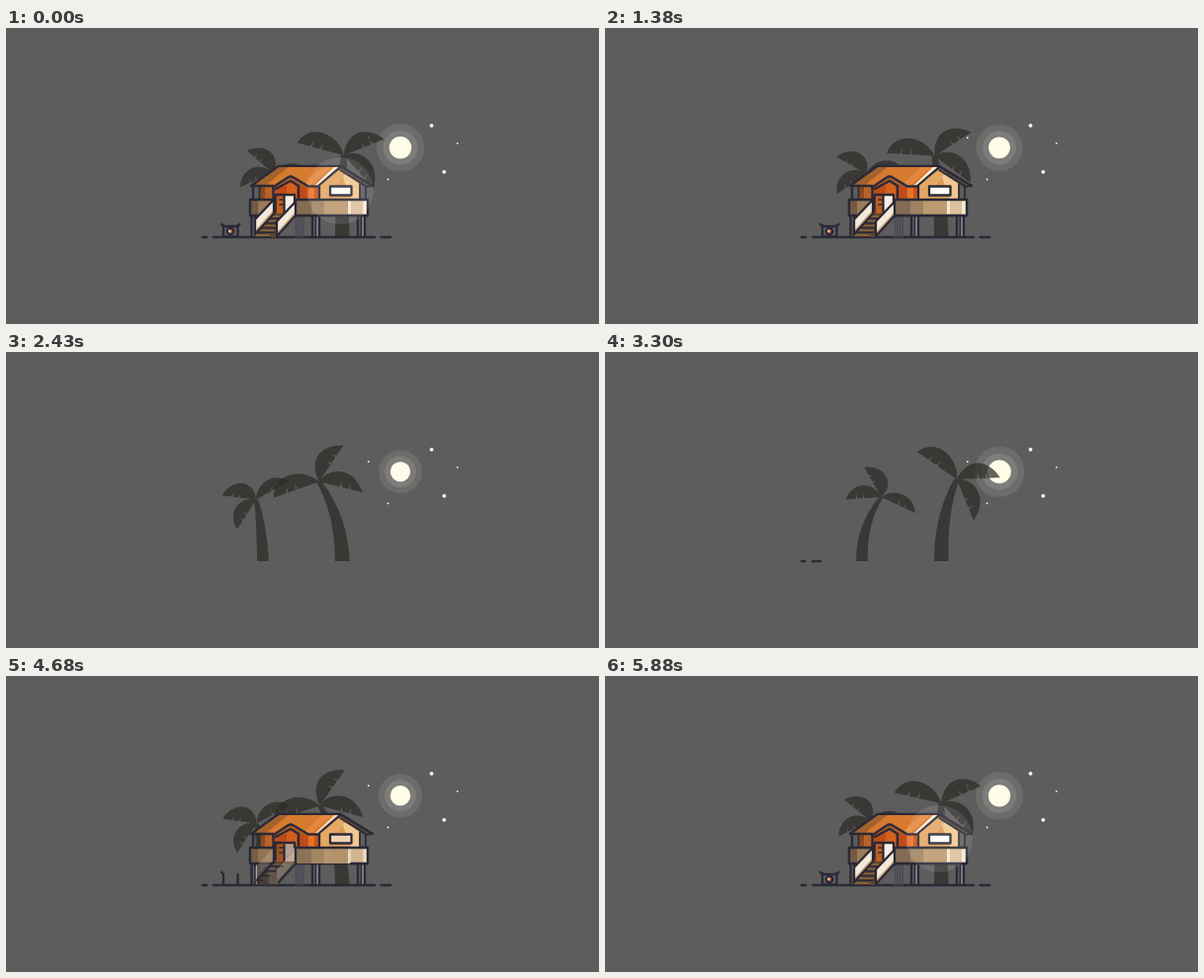
An HTML page that plays this animation: 600 px wide and 300 px high, repeating every 5910 ms.

```html
<!DOCTYPE html>
<html lang="en">
<head>
<meta charset="utf-8">
<title>Beach house at night</title>
<style>
  html, body { margin: 0; width: 100%; height: 100%; overflow: hidden; background: #5d5d5d; }
  svg { display: block; width: 600px; height: 300px; }
  .palm { fill: #2c2b27; opacity: .72; }
  .line { fill: none; stroke: #2a2937; stroke-width: 2.3; stroke-linecap: round; stroke-linejoin: round; }
  .thin { stroke-width: 1.7; }
  .far { stroke: #484854; stroke-width: 1.4; }
</style>
</head>
<body>
<svg viewBox="0 0 600 300">
  <g fill="#fffde8">
    <circle id="halo" cx="399" cy="121.3" r="24" fill="#fffff4" opacity=".09"/>
    <circle id="ring" cx="399" cy="121.3" r="17" fill="#fffff4" opacity=".11"/>
    <circle id="moon" cx="399" cy="121.3" r="11"/>
    <circle cx="430.6" cy="98.8" r="1.9"/>
    <circle cx="443.3" cy="145.8" r="1.9"/>
    <circle cx="456.8" cy="116.8" r=".9"/>
    <circle cx="386.6" cy="153.4" r=".9"/>
    <circle cx="366.8" cy="111.2" r=".9"/>
  </g>
  <g id="palms"></g>
  <g id="house"></g>
  <circle id="glow" cx="338" cy="165" r="34" fill="#fff"/>
  <circle id="pulse" cx="338" cy="165" r="8" fill="#fff"/>
  <path id="smoke" d="M227 207V181C227 168 209 172 209 152" fill="none" stroke="#b4b4b0" stroke-width="2.6"/>
</svg>
<script>
const LOOP = 5910, SWAY = 2955, PEAK = 612;
const $ = id => document.getElementById(id);
const clamp = x => Math.max(0, Math.min(1, x));
const ramp = (t, from, dur) => clamp((t - from) / dur);

function add(parent, tag, attrs) {
  const el = document.createElementNS('http://www.w3.org/2000/svg', tag);
  for (const key in attrs) el.setAttribute(key, attrs[key]);
  return parent.appendChild(el);
}

// A leaf arches from the crown to its tip; its lower edge returns with two notches.
function leafPath([ax, ay, bx, by, x, y]) {
  const side = Math.sign(x), len = Math.hypot(x, y);
  const nx = side * y / len, ny = -side * x / len;
  const at = (k, depth = 0) => `L${x * k + nx * depth} ${y * k + ny * depth}`;
  const cut = k => at(k + .02) + at(k - .02, len * .13) + at(k - .02);
  return `M0 0C${ax} ${ay} ${bx} ${by} ${x} ${y}` + cut(.7) + cut(.5) + 'Z';
}

function makePalm(spec) {
  const group = add($('palms'), 'g', { class: 'palm' });
  const trunk = add(group, 'path', {});
  const crown = add(group, 'g', {});
  spec.leaves.forEach(leaf => add(crown, 'path', { d: leafPath(leaf) }));
  return { ...spec, trunk, crown };
}

const palms = [
  makePalm({
    x: 270, y: 147, reach: 16.5, left: 254, right: 266, bend: 176, top: 2.2,
    leaves: [[10, -17, -6, -32, -26, -23], [-11, -12, -32, -7, -33, 14], [8, -12, 30, -15, 38, 4]]
  }),
  makePalm({
    x: 342, y: 129, reach: 24.5, left: 333, right: 347.7, bend: 165, top: 2.8,
    leaves: [[-4, -20, -32, -35, -47, -13], [4, -28, 26, -28, 41, -16], [14, -7, 38, 5, 30, 34]]
  })
];

function swayPalm(p, sway) {
  const lean = sway - .28;
  const x = p.x + p.reach * lean;
  const y = p.y + Math.max(0, -lean) * 2.4;
  p.crown.setAttribute('transform', `translate(${x} ${y}) rotate(${34 * lean})`);
  p.trunk.setAttribute('d', `M${p.left} 212Q${p.left} ${p.bend} ${x - p.top} ${y}` +
    `H${x + p.top}Q${p.right - 2} ${p.bend} ${p.right} 212Z`);
}

// House parts: lines draw themselves, fills fade in.
const house = $('house'), parts = [];
function line(d, start, dur, cls = '') {
  const el = add(house, 'path', { d, class: 'line ' + cls, pathLength: 1 });
  parts.push(t => {
    const p = ramp(t, start, dur);
    el.style.visibility = p > 0 ? 'visible' : 'hidden';
    el.style.strokeDasharray = p < 1 ? `${p} 2` : 'none';
  });
}
function fill(d, color, start, dur = 220) {
  const el = add(house, 'path', { d, fill: color });
  parts.push(t => { el.style.opacity = ramp(t, start, dur); });
}

line('M199 212H203', 3250, 60);
line('M210 212H373', 3280, 420);
line('M379.5 212H389', 3680, 70);

// Stilts
for (const [i, x] of [248, 309.5, 355.5].entries()) {
  line(`M${x + .5} 212v-22`, 3720 + i * 60, 200);
  line(`M${x + 4} 212v-22`, 3740 + i * 60, 200, 'thin');
  line(`M${x + 7.5} 212v-22`, 3760 + i * 60, 200);
  fill(`M${x + 5} 191h1v20h-1z`, '#a2a1a2', 3800 + i * 60);
}
for (const x of [293.5, 296, 298.5, 301]) line(`M${x} 212v-22`, 3800, 200, 'far');

// Deck frame
line('M273 190H247V174H271', 3960, 345);
line('M314 190H366V174H293', 3960, 250);
line('M314 190V174H293L274 195', 3960, 277);
line('M293 190H314', 3960, 120);
fill('M293 185h7v5h-7z', '#5c4a2e', 4060, 60);

// Back roof and walls
fill('M338 140L371 160L366 162L338 144Z', '#54443f', 4400);
fill('M257 160H317V174H257Z', '#8c4a22', 4350);
fill('M262 160H270V174H262Z', '#b5632b', 4380);
fill('M297 160H317V174H297Z', '#cf5018', 4380);
fill('M306 160H312V174H306Z', '#e4742a', 4400);
fill('M318 159L338 143L358 158V174H318Z', '#dc9c58', 4420);
fill('M338 143L358 158V174H349Z', '#f0c78f', 4460);
fill('M338 143L344 147L325 174H318V159Z', '#e5a764', 4460);
line('M317 174V160', 4250, 180);
line('M358 174V158', 4250, 180, 'thin');
line('M364 174V161', 4250, 180, 'thin');
line('M250 174V161', 4250, 180);
line('M256.5 174V161', 4250, 180, 'thin');

// Main roof
fill('M248 160L276 140H338L316 160Z', '#d67a2f', 4450);
fill('M248 160L276 140H287L262 160Z', '#a3622e', 4480);
fill('M299 160L321 140H331L308 160Z', '#e38a40', 4490);
fill('M333 140H338L317 160H312Z', '#fff1dc', 4510);
line('M248 160L276 139.8H338L371 160', 4200, 380);
line('M338 141L316 160', 4400, 180);
line('M371 160L365 161L338 144', 4450, 180, 'thin');
line('M248 160H270', 4400, 150);

// Porch gable
fill('M271 161L288 151.5L305 161V174H271Z', '#bf4c18', 4480);
fill('M271 161L288 151.5L294 155V174H284V160Z', '#d4601f', 4500);
fill('M276 158L288 150L306 160L302 162L288 155L274 163Z', '#a85a2b', 4520);
line('M270 161.5L285 151.5Q288 149.5 291 151.5L306 160.5H316', 4350, 300);
line('M273 163L288 155L296 160V172', 4450, 200);
line('M270.5 174V162', 4400, 150);

// Window
fill('M328 160.5H349.5V169.5H328Z', '#fffdf4', 4560);
line('M328 160.5H349.5V169.5H328Z', 4420, 260);

// Deck boards
fill('M247 174H271V190H247Z', '#9a7a57', 4480);
fill('M247 174H255V190H247Z', '#735a42', 4500);
fill('M292 174H366V190H292Z', '#bd9b70', 4480);
fill('M292 174H309V190H292Z', '#836c54', 4500);
fill('M309 174H322V190H309Z', '#9f8463', 4500);
fill('M346 174H366V190H346Z', '#dcc19b', 4520);
fill('M346 174H349V190H346ZM361 174H366V190H361Z', '#f6e8d0', 4540);
line('M271 190H247V174H366V190H292', 4450, 300);

// Doorway
fill('M272 169H292V190H272Z', '#6e3b1e', 4520);
fill('M273.5 170H281V188H273.5Z', '#bd5d20', 4540);
fill('M282 169.5H292V188H282Z', '#f7efe3', 4560);
line('M272.5 186V169H292V178', 4500, 200);
line('M281.5 187V170', 4520, 180);
line('M277 174H280M277 179H280', 4560, 120, 'thin');

// Stairs
fill('M271 188L252 210V212H274L292 190Z', '#5f4733', 4600);
for (let i = 0; i < 5; i++) {
  const x = 272 - i * 4, y = 190 + i * 4.8;
  fill(`M${x - 4} ${y}h15v2h-15z`, '#86643f', 4620 + i * 20);
  line(`M${x - 4} ${y + 2.8}h15`, 4600 + i * 20, 100, 'thin');
}
for (const [x, y] of [[271, 174], [293, 176]]) {
  fill(`M${x} ${y}V${y + 14}L${x - 19} ${y + 35}V${y + 20}Z`, '#c9ab88', 4640);
  fill(`M${x} ${y}V${y + 10}L${x - 19} ${y + 31}V${y + 20}Z`, '#f4e9da', 4660);
  line(`M${x} ${y}V${y + 14}L${x - 19} ${y + 35}V${y + 20}Z`, 4560, 260);
}

// Campfire
line('M220 211V200M234.5 211V200', 4600, 180);
line('M218 198.8L220 201H234.5L236.5 198.8', 4660, 180);
fill('M222.7 206a4.3 4.3 0 1 0 8.6 0a4.3 4.3 0 1 0 -8.6 0', '#2a2937', 4760);
fill('M225 206a2 2 0 1 0 4 0a2 2 0 1 0 -4 0', '#c9693a', 4800);
fill('M225.2 204.8h2v2h-2z', '#ecd3ba', 4820);
line('M222 211H232', 4760, 120, 'thin');

function drawHouse(t) {
  const leaving = t < 3000;
  const run = Math.max(0, t - 1400) / 560;
  house.style.display = leaving && t > 2010 ? 'none' : '';
  house.style.opacity = leaving ? 1 - ramp(t, 1620, 390) : 1;
  house.setAttribute('transform', `translate(${leaving ? 120 * run * run : 0} 0)`);
  parts.forEach(part => part(leaving ? LOOP : t));
}

// Lamp light: a wide steady glow with a pulse spreading inside it.
function drawGlow(t) {
  const light = t < 3000 ? 1 - ramp(t, 60, 1200) : ramp(t, 4950, 250);
  const spread = ramp(t, 5050, 800);
  $('glow').style.opacity = .1 * light;
  $('pulse').setAttribute('r', 10 + 24 * Math.sin(spread * Math.PI / 2));
  $('pulse').style.opacity = spread > 0 ? .26 * (1 - spread) : 0;
}

function drawSmoke(t) {
  const p = ramp(t, 5130, 680), smoke = $('smoke');
  smoke.style.display = p > 0 && p < 1 ? '' : 'none';
  smoke.style.strokeDasharray = '12 200';
  smoke.style.strokeDashoffset = -70 * p;
  smoke.style.opacity = 1 - ramp(p, .5, .5);
}

function draw(t) {
  const sway = Math.cos((t - PEAK) / SWAY * 2 * Math.PI);
  palms.forEach(p => swayPalm(p, sway));
  const r = 23.7 + 2.3 * sway;
  $('halo').setAttribute('r', r);
  $('ring').setAttribute('r', r * .72);
  $('moon').setAttribute('r', r * .462);
  drawHouse(t);
  drawGlow(t);
  drawSmoke(t);
}

const began = performance.now();
function tick() {
  draw((performance.now() - began) % LOOP);
  requestAnimationFrame(tick);
}
tick();
</script>
</body>
</html>
```
